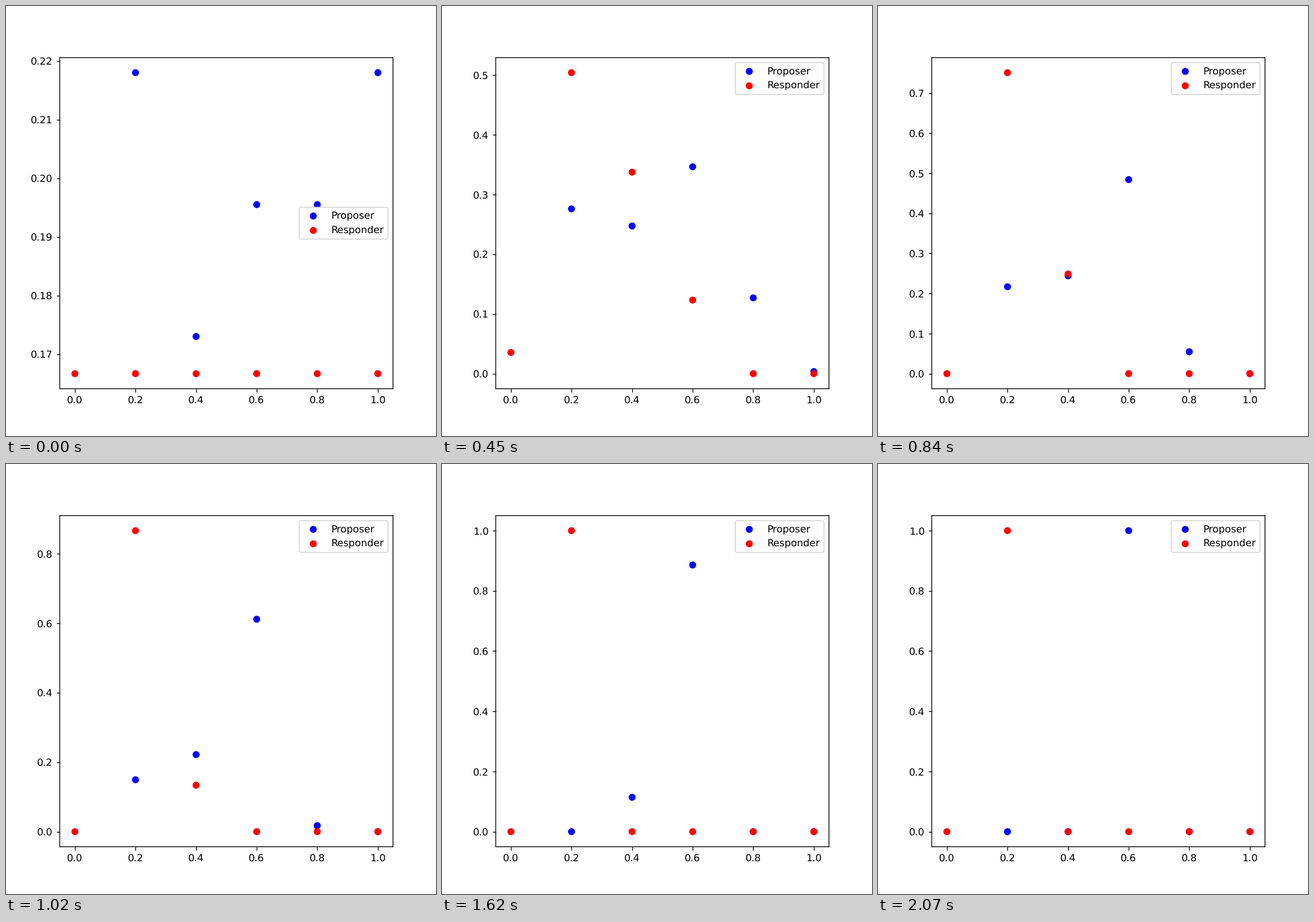
A matplotlib script for the animation above (8 s loop, 748 by 748 pixels).

```python
import matplotlib.pyplot as plt
import numpy as np
from matplotlib.animation import FuncAnimation

SIZE, INCHES = 748, 6
LOOP, FRAMES = 8000, 267
LAST = 69  # the strategies have settled from here on

# Each share follows a parabola (start, speed, bend) down to extinction;
# with two of them it rises along the first and falls along the second.
PROPOSER = {
    0.2: [(.218, .0092, -.00033), (.290, .00016, -.000073)],
    0.4: [(.173, .0072, -.00015), (.2873, .00025, -.000064)],
    0.8: [(.1955, -.00405, -.000035)],
    1.0: [(.218, -.0128, -.0001)],
}
RESPONDER = {
    0.0: [(1 / 6, -.00875, 0)],
    0.4: [(1 / 6, .02113, -.00065), (.6953, -.0201, .00015)],
    0.6: [(1 / 6, .0082, -.00074)],
    0.8: [(1 / 6, -.01124, 0)],
    1.0: [(1 / 6, -.0215, 0)],
}


def shares(t, rules, winner):
    """Points (strategy, share); the winner takes what the others leave."""
    out = {x: max(0, min(a + b * t + c * t * t for a, b, c in paths))
           for x, paths in rules.items()}
    out[winner] = 1 - sum(out.values())
    return np.array(sorted(out.items()))


def dots(color, label):
    # one colour per dot keeps their positions free of pixel rounding
    return ax.scatter([0, 1], [0, 1], color=[color] * 2, label=label)


plt.rcParams.update({"text.hinting": "none", "path.snap": False})
fig, ax = plt.subplots(figsize=(INCHES, INCHES), dpi=SIZE / INCHES)
fig.subplots_adjust(left=0.125, right=0.9, bottom=0.11, top=0.88)
blue = dots("blue", "Proposer")
red = dots("red", "Responder")
ax.set_xlim(-0.05, 1.05)
ax.legend(loc="best").get_frame().set_snap(False)


def update(frame):
    t = min(frame, LAST)
    offers = shares(t, PROPOSER, 0.6)
    replies = shares(t, RESPONDER, 0.2)
    blue.set_offsets(offers)
    red.set_offsets(replies)
    ys = np.concatenate([offers[:, 1], replies[:, 1]])
    pad = 0.05 * np.ptp(ys)
    ax.set_ylim(ys.min() - pad, ys.max() + pad)
    return blue, red


anim = FuncAnimation(fig, update, frames=FRAMES, interval=LOOP / FRAMES,
                     repeat=True, repeat_delay=0)
plt.show()
```
